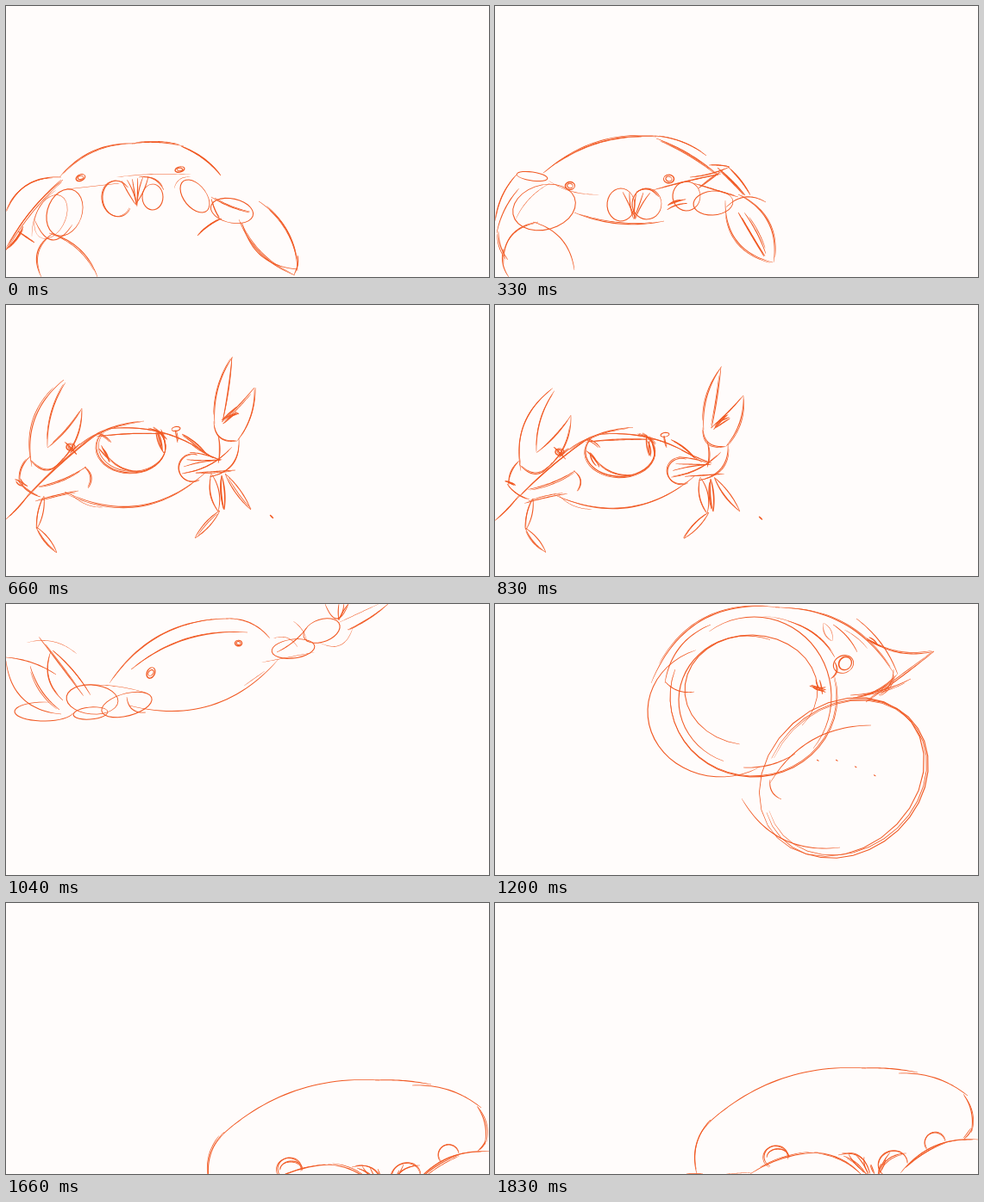
Recreate the animation shown at these times as an HTML page with a canvas. Size 560 by 315 pixels, loop 2.41 s.

```html
<!DOCTYPE html>
<html lang="en">
<head>
<meta charset="utf-8">
<title>Crab sketch</title>
<style>
html, body { margin: 0; width: 100%; height: 100%; overflow: hidden; background: #fffcfb; }
canvas { display: block; }
</style>
</head>
<body>
<canvas id="stage" width="560" height="315"></canvas>
<script>
const ctx = document.getElementById('stage').getContext('2d');
const LOOP = 2410, STEPS = 28, RAD = Math.PI / 180;
const FINE = 0.55, FIRM = 1.15, HEAVY = 1.7;
let view = [1, 1, 0, 0], seed = 1;

function random() {
  seed = (seed * 16807) % 2147483647;
  return seed / 2147483647;
}
const jitter = size => (random() * 2 - 1) * size;
const mix = (a, b, t) => a + (b - a) * t;

// One pen stroke along pos(0..1), tapered towards both ends.
function pen(pos, width) {
  const [sx, sy, dx, dy] = view;
  const left = [], right = [];
  const at = t => {
    const [x, y] = pos(t);
    return [x * sx + dx, y * sy + dy];
  };
  for (let i = 0; i <= STEPS; i++) {
    const t = i / STEPS;
    const [x, y] = at(t), [ax, ay] = at(t - 0.01), [bx, by] = at(t + 0.01);
    const half = width * (0.3 + 0.7 * Math.sqrt(Math.sin(Math.PI * t) + 1e-6)) / 2;
    const len = Math.hypot(bx - ax, by - ay) || 1;
    const nx = (by - ay) / len * half, ny = (ax - bx) / len * half;
    left.push([x + nx, y + ny]);
    right.unshift([x - nx, y - ny]);
  }
  ctx.beginPath();
  for (const p of [...left, ...right]) ctx.lineTo(...p);
  ctx.fill();
}

// Later passes wander a little and are lighter.
function passes(count, width, draw) {
  for (let i = 0; i < count; i++) draw(i ? 1.3 : 0, i ? width * 0.75 : width);
}

// Bow between two points; a positive bulge leans to the left of travel.
function arc(x1, y1, x2, y2, bulge = 0, count = 2, width = FIRM) {
  const len = Math.hypot(x2 - x1, y2 - y1);
  passes(count, width, (wander, w) => {
    const lean = bulge + jitter(wander), ox = jitter(wander), oy = jitter(wander);
    const from = wander && random() * 0.15, to = 1 - (wander && random() * 0.15);
    pen(s => {
      const t = mix(from, to, s), lift = 4 * t * (1 - t) * lean / len;
      return [mix(x1, x2, t) + (y2 - y1) * lift + ox, mix(y1, y2, t) - (x2 - x1) * lift + oy];
    }, w);
  });
}

// Part of a tilted ellipse, angles in degrees.
function part(x, y, rx, ry, tilt, a0, a1, count = 1, width = FIRM) {
  const c = Math.cos(tilt * RAD), s = Math.sin(tilt * RAD);
  passes(count, width, (wander, w) => {
    const ox = jitter(wander), oy = jitter(wander), grow = 1 + jitter(wander) * 0.02;
    pen(t => {
      const a = mix(a0, a1, t) * RAD;
      const u = Math.cos(a) * rx * grow, v = Math.sin(a) * ry * grow;
      return [x + u * c - v * s + ox, y + u * s + v * c + oy];
    }, w);
  });
}

const loop = (x, y, rx, ry, tilt = 0, width = FIRM) => {
  const a = random() * 360;
  part(x, y, rx, ry, tilt, a, a + 375, 1, width);
};
const hair = (x1, y1, x2, y2, bulge = 0) => arc(x1, y1, x2, y2, bulge, 1, FINE);
const leaf = (x1, y1, x2, y2, half, width = FIRM) => {
  arc(x1, y1, x2, y2, half, 1, width);
  arc(x1, y1, x2, y2, -half, 2, width);
};
const eye = (x, y, rx, ry, tilt = 0) => {
  loop(x, y, rx, ry, tilt, 1.5);
  loop(x, y, rx * 0.6, ry * 0.6, tilt + 15);
};

// Lines from an edge that meet in one tip.
function fan(x, y, x1, y1, x2, y2, count) {
  for (let i = 0; i < count; i++) {
    const t = i / (count - 1);
    arc(mix(x1, x2, t), mix(y1, y2, t), x + jitter(1.5), y + jitter(1.5), jitter(2), 1);
  }
}

// Quick scribbled shading.
function hatch(x, y, length, angle, count) {
  for (let i = 0; i < count; i++) {
    const a = (angle + jitter(14)) * RAD, half = length * (0.8 + jitter(0.2)) / 2;
    const cx = x + jitter(3), cy = y + jitter(3);
    arc(cx - Math.cos(a) * half, cy - Math.sin(a) * half,
      cx + Math.cos(a) * half, cy + Math.sin(a) * half, jitter(2), 1, HEAVY * 0.85);
  }
}

function rest() {
  arc(62, 199, 150, 160, 12);
  arc(146, 160, 206, 163, 3);
  arc(203, 163, 249, 197, 4, 2, HEAVY);
  eye(86.5, 199.5, 5.5, 3.5, -25);
  eye(201.5, 190, 5.5, 3, -15);
  hair(70, 213, 132, 206);
  hair(128, 199, 215, 196, 2);
  // mouth
  part(129, 224, 17, 21, -10, 40, 330, 2);
  loop(170, 222, 12, 15);
  fan(151, 232, 134, 203, 165, 198, 6);
  arc(154, 199, 183, 214, 6);
  // right arm
  loop(219, 221, 22, 13, 52);
  hair(195, 212, 214, 199, 5);
  loop(262, 238, 25, 14, 12);
  arc(238, 222, 282, 240, -2);
  arc(238, 224, 248, 248, -1);
  arc(222, 267, 250, 247, 2, 2, HEAVY);
  arc(293, 227, 338, 308, 12, 3);
  arc(270, 248, 335, 313, -10);
  arc(274, 252, 338, 306, -15, 1);
  arc(338, 290, 334, 312, 2);
  // left arm
  loop(68, 240, 20, 28, 20);
  loop(52, 245, 17, 27, 25, FINE);
  arc(34, 250, 77, 254, -20, 1);
  arc(41, 315, 55, 264, 12);
  arc(50, 264, 106, 315, 10);
  arc(0, 238, 64, 199, 13, 3);
  arc(0, 284, 66, 202, 6, 3);
  arc(0, 283, 20, 256, -2, 2, HEAVY);
  arc(14, 262, 33, 275, 0, 1, HEAVY);
  hair(30, 268, 58, 214, 8);
}

function crouch() {
  arc(56, 194, 187, 152, 14, 3);
  arc(185, 151, 245, 174, 5);
  arc(187, 154, 259, 197, 4, 3);
  eye(87, 209, 5.5, 4.5);
  eye(201.5, 201, 6, 4.8);
  hair(62, 203, 121, 219, -5);
  arc(92, 240, 196, 250, -8);
  arc(183, 214, 262, 195, 1);
  // mouth
  loop(146, 231, 16, 19);
  loop(176, 230, 17, 18);
  fan(162, 247, 148, 216, 180, 217, 5);
  arc(164, 216, 190, 222, 6);
  hatch(210, 231, 26, -25, 3);
  // right arm
  loop(222, 221, 16, 17);
  loop(253, 229, 23, 14, -5);
  arc(248, 185, 272, 187, 1);
  arc(270, 187, 296, 220, 2, 3);
  arc(258, 188, 290, 220, 1, 2, HEAVY);
  arc(226, 199, 272, 187, -2);
  arc(230, 206, 282, 222);
  arc(236, 212, 264, 191);
  arc(282, 219, 323, 298, 16);
  arc(267, 226, 322, 298, -18);
  arc(268, 234, 314, 228, 9, 1);
  arc(282, 240, 312, 291, 0, 2, HEAVY);
  arc(289, 240, 314, 288, 2);
  // left arm
  loop(43, 198, 18, 5, 8);
  arc(0, 250, 26, 195, 5);
  loop(57, 234, 37, 26, -15);
  hair(24, 248, 64, 206, 5);
  arc(10, 300, 50, 251, 14);
  arc(44, 251, 92, 307, 12, 1);
  arc(4, 262, 15, 295, -3);
  arc(10, 282, 16, 315, -4, 1);
  arc(2, 264, 28, 212, 4, 1);
}

function clawsUp() {
  // left claw
  arc(30, 188, 67, 87, 16);
  arc(48, 165, 69, 90, 6);
  arc(48, 166, 88, 120, -3);
  arc(88, 120, 54, 190, 10);
  arc(28, 180, 66, 178, -13);
  eye(75, 165, 5, 4);
  arc(68, 159, 82, 174);
  arc(74, 172, 86, 161);
  arc(28, 176, 16, 206, -4);
  arc(14, 204, 40, 223, -3);
  arc(38, 211, 93, 188, -3);
  arc(91, 188, 95, 213, 6);
  arc(24, 224, 110, 147, 3, 3);
  hatch(18, 205, 14, 35, 3);
  // left legs
  arc(0, 249, 28, 218, -1);
  leaf(44, 222, 36, 260, 3);
  leaf(35, 258, 59, 288, 3);
  arc(34, 228, 84, 216, 1);
  // shell
  arc(84, 163, 160, 135, 6);
  arc(105, 153, 185, 150, 2);
  arc(118, 144, 240, 178, 13);
  arc(204, 150, 232, 173, 2, 2, HEAVY);
  arc(68, 217, 232, 194, -28);
  hair(74, 218, 113, 235, -5);
  // mouth
  part(145, 165, 40, 30, 0, -50, 215, 3);
  hatch(180, 158, 28, 75, 4);
  hatch(113, 172, 26, 62, 3);
  arc(165, 143, 186, 156, 2);
  arc(106, 149, 122, 160, 2);
  arc(118, 176, 160, 193, -6);
  loop(197, 144, 5, 2.5, -10);
  arc(196, 145, 199, 160);
  // right arm
  part(216, 189, 16, 16, 0, 60, 290, 2);
  arc(204, 196, 262, 165, -6);
  fan(250, 180, 206, 188, 216, 163, 4);
  arc(270, 155, 236, 200, 12);
  arc(220, 195, 266, 192);
  arc(246, 152, 246, 184, 2);
  // right claw
  arc(242, 138, 263, 60, 7);
  arc(262, 61, 251, 136, 1);
  arc(288, 96, 250, 136, 1);
  arc(288, 96, 268, 158, 6);
  arc(241, 135, 268, 158, -10);
  hatch(262, 128, 24, -35, 4);
  // right legs
  leaf(238, 196, 246, 240, 5);
  leaf(248, 239, 219, 271, 3);
  leaf(250, 198, 253, 238, 2, HEAVY);
  leaf(254, 196, 284, 238, 3);
  arc(306, 244, 310, 248, 0, 1, HEAVY);
}

function leap() {
  arc(120, 92, 258, 17, 21);
  arc(255, 17, 306, 40, 7, 1);
  arc(145, 76, 280, 33, 14);
  arc(143, 118, 316, 64, -28, 1);
  hair(276, 95, 300, 78);
  eye(168, 80, 4.5, 6.5, 25);
  eye(269.5, 45.5, 4, 3.3);
  // left arm
  loop(140, 117, 30, 13, -15);
  loop(100, 111, 30, 17, 5);
  loop(98, 127, 20, 7, -5);
  arc(140, 108, 162, 126, -7, 1);
  hair(94, 94, 165, 104, 3);
  arc(0, 62, 58, 82, 4, 1);
  arc(0, 66, 64, 128, -18, 1);
  part(44, 125, 34, 11, 0, 10, 280);
  arc(28, 72, 62, 123, -5);
  arc(52, 55, 66, 112, -10);
  arc(54, 54, 98, 106, 3);
  arc(38, 38, 90, 107, 0);
  hair(24, 45, 82, 58, 8);
  // right arm
  loop(333, 52, 25, 11, -7);
  loop(366, 31, 22, 13, -20);
  hair(362, 44, 402, 28, -13);
  hair(296, 68, 358, 56);
  hair(310, 40, 338, 50, 6);
  arc(314, 56, 350, 26, -3, 1);
  hair(333, 20, 349, 44, 3);
  arc(370, 0, 397, 0, -17, 1);
  arc(443, 0, 396, 30, 2);
  fan(386, 18, 386, 0, 397, 0, 3);
  hair(432, 0, 385, 22);
}

function turn() {
  arc(181, 92, 330, 4, 33);
  arc(325, 4, 462, 80, 22);
  arc(462, 76, 445, 106, 5);
  part(262, 125, 85, 76, 0, 60, 250);
  arc(197, 92, 250, 24, 12, 1);
  arc(197, 90, 231, 102, -5, 1);
  // near claw
  part(297, 100, 77, 64, 0, 100, 400);
  part(292, 112, 79, 75, 0, 110, 290);
  part(300, 108, 97, 93, 0, -15, 200, 2);
  part(300, 108, 90, 93, 0, 235, 400);
  arc(340, 20, 394, 62, 7);
  arc(288, 190, 348, 174, -5, 1);
  hair(310, 14, 392, 56, 10);
  loop(404, 70, 12, 10, -25);
  loop(406, 69, 8, 7, -50, HEAVY);
  arc(393, 66, 389, 87, 5);
  hatch(376, 97, 22, 15, 4);
  hatch(376, 97, 22, 75, 2);
  // spikes
  leaf(381, 22, 391, 43, 4, FINE);
  hair(405, 30, 432, 52, 2);
  arc(392, 24, 420, 56, 3, 1);
  arc(419, 17, 467, 82, 6, 1);
  arc(431, 40, 509, 55, -9);
  arc(509, 55, 430, 114, 1);
  hatch(440, 44, 18, 30, 3);
  arc(412, 106, 482, 87, -4);
  arc(415, 109, 466, 82, -6);
  // far claw
  loop(402, 201, 103, 84, -40);
  part(407, 203, 102, 85, -40, -120, 200, 2);
  arc(286, 226, 400, 283, -21, 1);
  arc(436, 141, 319, 208, -19, 1);
  arc(319, 204, 332, 227, -5, 1);
  for (let x = 373; x < 450; x += 22) {
    const y = 181 + Math.max(0, x - 400) * 0.45;
    arc(x, y, x + 2.5, y + 1.5, 0, 1);
  }
}

function closeUp() {
  arc(190, 262, 330, 147, 25);
  arc(326, 148, 490, 120, 9);
  arc(486, 120, 560, 154, 7);
  arc(236, 212, 340, 143, 3);
  hair(200, 220, 412, 124, 16);
  hair(495, 103, 560, 129, 5);
  // left claw
  arc(218, 315, 208, 265, 6);
  arc(208, 268, 332, 161, 22);
  arc(328, 161, 406, 258, 20);
  arc(406, 250, 390, 315, 6);
  arc(215, 315, 262, 186, 26);
  hair(264, 179, 203, 256, -8);
  hair(212, 285, 335, 163, 22);
  arc(347, 160, 387, 234, 13, 1);
  arc(376, 187, 398, 266, 6);
  arc(404, 265, 395, 297, 3);
  hair(386, 275, 390, 315, 4);
  hair(374, 315, 387, 304);
  arc(385, 257, 465, 238, 0, 3);
  // right claw
  arc(452, 246, 490, 148, 14);
  arc(460, 285, 530, 155, 29);
  arc(465, 270, 530, 153, 27);
  arc(524, 154, 560, 164, 4);
  arc(458, 250, 489, 298, -15);
  arc(464, 285, 560, 298, -25);
  hair(470, 180, 528, 146, 4);
  arc(486, 174, 516, 152, 2);
  arc(531, 158, 560, 157, 7, 1);
  hair(542, 162, 548, 165, -5);
}

function sink() {
  arc(234, 315, 250, 252, 9);
  arc(249, 254, 430, 192, 20, 1);
  arc(425, 192, 490, 197, 2, 1);
  arc(468, 198, 548, 224, 8, 1);
  arc(543, 222, 552, 267, 5);
  arc(553, 262, 544, 274, 1);
  hair(236, 272, 270, 238, 3);
  part(326, 295, 14, 13, 0, 120, 370, 2);
  part(328, 296, 13, 10, 0, 180, 360, 2);
  arc(296, 315, 375, 290, 6);
  arc(370, 290, 424, 315, 6);
  arc(222, 315, 241, 315, 0, 1, HEAVY);
  hair(268, 315, 298, 313);
  // mouth
  arc(398, 293, 435, 315, 11);
  arc(404, 294, 430, 315, 3);
  fan(432, 315, 410, 292, 428, 295, 3);
  part(461, 303, 17, 15, -20, 150, 380, 2);
  arc(445, 312, 477, 291, 6);
  fan(444, 315, 448, 303, 458, 290, 3);
  arc(436, 304, 440, 315);
  part(510, 279, 12, 12, 0, 140, 350, 2);
  arc(470, 314, 560, 275, 13);
  arc(476, 308, 522, 279, 3);
}

// start time, pose, x scale, y scale, x shift, y shift
const beats = [
  [0, rest], [330, crouch], [410, crouch, 1, 1, 6, -12],
  [490, clawsUp, 1.3, 1.2, 10, 22], [580, clawsUp, 1.3, 1.2, 10, -25],
  [660, clawsUp], [830, clawsUp, 1, 0.95, 0, 14],
  [1040, leap], [1120, turn, 0.85, 0.85, -20, -38],
  [1200, turn], [1290, turn, 1.05, 1.05, 12, 32],
  [1330, closeUp, 1, 1, -24, -50], [1370, closeUp, 1, 1, -10, -22],
  [1450, closeUp], [1540, sink, 1, 1, -22, -22],
  [1660, sink, 1, 1, 3, 14], [1750, sink, 1, 1, 1, 5], [1830, sink]
];

const start = performance.now();
let shown = null;

function frame() {
  const time = (performance.now() - start) % LOOP;
  const beat = beats.filter(b => b[0] <= time).pop() || beats[0];
  if (beat !== shown) {
    shown = beat;
    const [at, pose, sx = 1, sy = 1, dx = 0, dy = 0] = beat;
    view = [sx, sy, dx, dy];
    seed = at + 7;
    ctx.fillStyle = '#fffcfb';
    ctx.fillRect(0, 0, 560, 315);
    ctx.fillStyle = '#f15a24';
    pose();
  }
  requestAnimationFrame(frame);
}
frame();
</script>
</body>
</html>
```
